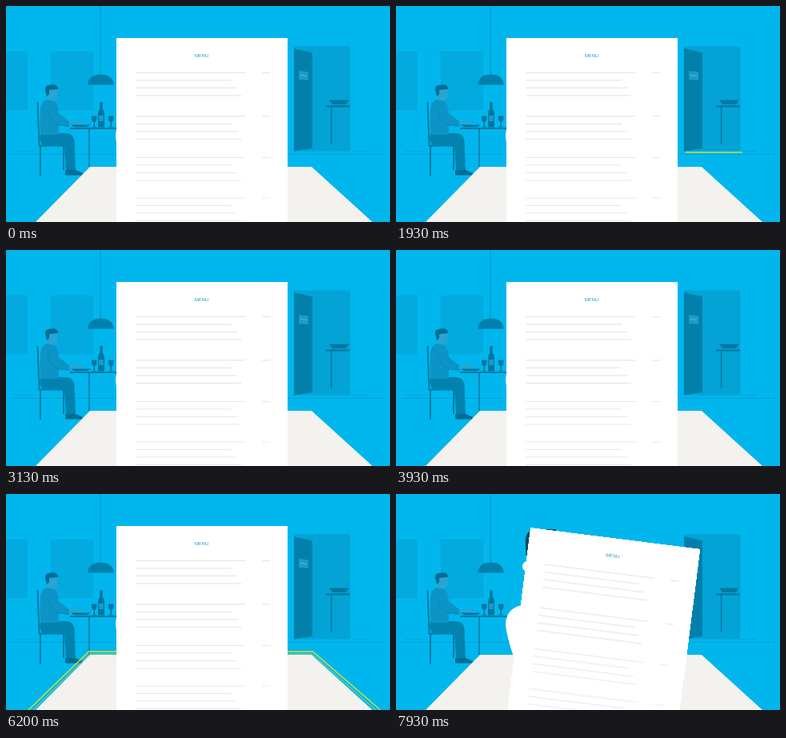
Recreate the animation shown at these times as an HTML page. Size 480 by 270 pixels, loop 8 s.

```html
<!DOCTYPE html>
<html lang="en">
<head>
<meta charset="utf-8">
<title>Menu</title>
<style>
  html, body { margin: 0; width: 100%; height: 100%; overflow: hidden; background: #00b6ed; }
  svg { display: block; width: 100vw; height: 100vh; }
  text { font: 6px "Open Sans", sans-serif; fill: #1593b8; text-anchor: middle; }

  .mark { fill: none; stroke: #f0e526; stroke-width: 1.8; stroke-dasharray: 1 2; }
  .mark-menu { animation: mark-menu 8s linear infinite; }
  .mark-door { stroke: #cade2c; stroke-width: 1.5; animation: mark-door 8s linear infinite; }
  .mark-table { stroke: #d5e225; stroke-width: 1.4; animation: mark-table 8s linear infinite; }
  .sheet { transform-origin: 138px 40px; animation: tilt 8s linear infinite; }

  @keyframes mark-menu {
    0%, 8% { stroke-dashoffset: 1; opacity: 0; }
    8.01% { stroke-dashoffset: 1; opacity: 1; animation-timing-function: ease-out; }
    15% { stroke-dashoffset: 0; opacity: 1; }
    20.5% { stroke-dashoffset: 0; opacity: 1; }
    23.3%, 100% { stroke-dashoffset: 0; opacity: 0; }
  }
  @keyframes mark-door {
    0%, 23.3% { stroke-dashoffset: 1; opacity: 0; }
    23.31% { stroke-dashoffset: 1; opacity: 1; animation-timing-function: ease-out; }
    31.2% { stroke-dashoffset: 0; opacity: 1; }
    35.4% { stroke-dashoffset: 0; opacity: 1; }
    39%, 100% { stroke-dashoffset: 0; opacity: 0; }
  }
  @keyframes mark-table {
    0%, 51.8% { stroke-dashoffset: 1; opacity: 0; }
    51.81% { stroke-dashoffset: 1; opacity: 1; animation-timing-function: ease-out; }
    62.5% { stroke-dashoffset: 0; opacity: 1; }
    85.2% { stroke-dashoffset: 0; opacity: 1; }
    88.4%, 100% { stroke-dashoffset: 0; opacity: 0; }
  }
  @keyframes tilt {
    0%, 92.8% { transform: none; animation-timing-function: ease-in-out; }
    99.1%, 100% { transform: translate(30px, 2px) rotate(7.2deg); }
  }
</style>
</head>
<body>
<svg viewBox="0 0 480 270" preserveAspectRatio="none">
  <rect width="480" height="270" fill="#00b6ed"/>

  <!-- wall -->
  <g fill="#02aadf" stroke="#05a0d2" stroke-width=".6">
    <rect x="-2" y="57.5" width="28" height="72.5"/>
    <rect x="56.5" y="57.5" width="52" height="72.5"/>
  </g>
  <path d="M6 185.3H474M12 181.3H36M432 181.3H450" stroke="#0a9fcd" stroke-width=".8"/>

  <!-- lamp -->
  <path d="M118 0V87" stroke="#078fbe" stroke-width=".9"/>
  <path d="M102 98.5C103 89 110 85.500 118.500 85.500S134 89 135 98.500Z" fill="#0180ac"/>

  <!-- doorway -->
  <rect x="360" y="50.500" width="70.500" height="131" fill="#04a3d6"/>
  <path d="M360 53L383 58.500V178L360 181.500Z" fill="#0280ab"/>
  <path d="M366 81L378 82.500V93L366 92Z" fill="#1a9cc8"/>
  <path d="M368 86.500L376 87.300" stroke="#52bbdd" stroke-width="1"/>
  <g fill="#0178a2">
    <path d="M404 117.500H429L425 123H408Z"/>
    <rect x="400" y="124.300" width="30" height="2.200"/>
    <rect x="405.800" y="126" width="1.600" height="47"/>
  </g>

  <!-- diner -->
  <path d="M39.500 120L41.500 174.500H73M43 174V212M72 174V205" fill="none" stroke="#0177a2" stroke-width="1.800"/>
  <path d="M44 159H76Q85 160 85.500 170L87 206H75L73 175H50Q42 174 42 163Z" fill="#0282af"/>
  <path d="M74 205H87L96 209Q97 211.500 95 211.500H74Z" fill="#016d95"/>
  <path d="M53 104H64.500V112Q65 118 60 118V121H51Z" fill="#27a5d2"/>
  <path d="M49 105Q48 98.500 56 98.500Q65 97 65 104L54 105V110L51 113Z" fill="#016d95"/>
  <path d="M50 117L60 119Q65 122 66 134L80 145L78 151L66 149L66 161H43Q42 145 43 128Q45 119 50 117Z" fill="#0b94c5"/>
  <path d="M52 130Q55 145 66 149L80 150" fill="none" stroke="#0788b7" stroke-width="1"/>
  <path d="M79 145L89 143L99 146L96 149H79Z" fill="#27a5d2"/>

  <!-- dining table -->
  <g fill="#0177a2">
    <rect x="80" y="152" width="60" height="1.900"/>
    <rect x="103.300" y="153" width="1.500" height="48"/>
    <path d="M81 148.500H106L102 151.300H85Z"/>
    <path d="M117.200 120H120.800V129Q123 131 123 134V151.500H115V134Q115 131 117.200 129Z"/>
    <g id="glass">
      <path d="M107 137.500H113.500Q114 144 111 145.300V150.500H113V151.500H107.500V150.500H109.600V145.300Q106.500 144 107 137.500Z"/>
    </g>
    <use href="#glass" x="21"/>
  </g>
  <rect x="116" y="137" width="6" height="7" fill="#1b9bc7"/>

  <!-- near table -->
  <path d="M37 270L105 201H382L458 270Z" fill="#f4f2ef"/>
  <g class="mark mark-table">
    <path pathLength="1" d="M28 270L103.500 197H383.500L468 270"/>
    <path pathLength="1" d="M34 270L104.500 200H382.500L462 270" stroke-width=".8"/>
  </g>

  <!-- guest holding the menu -->
  <path d="M200 44H172Q160 46 162 66Q162 78 166 88H200Z" fill="#074a68"/>
  <path d="M180 138H164Q138 140 137 162Q138 178 148 206L200 260Z" fill="#fff"/>
  <ellipse cx="164" cy="90.500" rx="6" ry="6.500" fill="#fff"/>

  <g class="sheet">
    <rect x="138" y="40" width="214" height="290" fill="#fff"/>
    <text x="244.500" y="63.500">MENU</text>
    <path id="rows" fill="none" stroke="#e9e6e8" stroke-width="1.200"/>
  </g>

  <rect class="mark mark-menu" pathLength="1" x="154" y="129.500" width="183.500" height="48.500"/>
  <path class="mark mark-door" pathLength="1" d="M433 183H355.500V48H433Z"/>
</svg>
<script>
  const sections = [83.3, 137.8, 189.5, 240];
  const rowEnds = [299, 282, 289, 294];
  const rows = sections.map(top =>
    rowEnds.map((end, i) => `M162 ${top + i * 9.5}H${end}`).join('') + `M320 ${top}H330.5`);
  document.getElementById('rows').setAttribute('d', rows.join(''));
</script>
</body>
</html>
```
